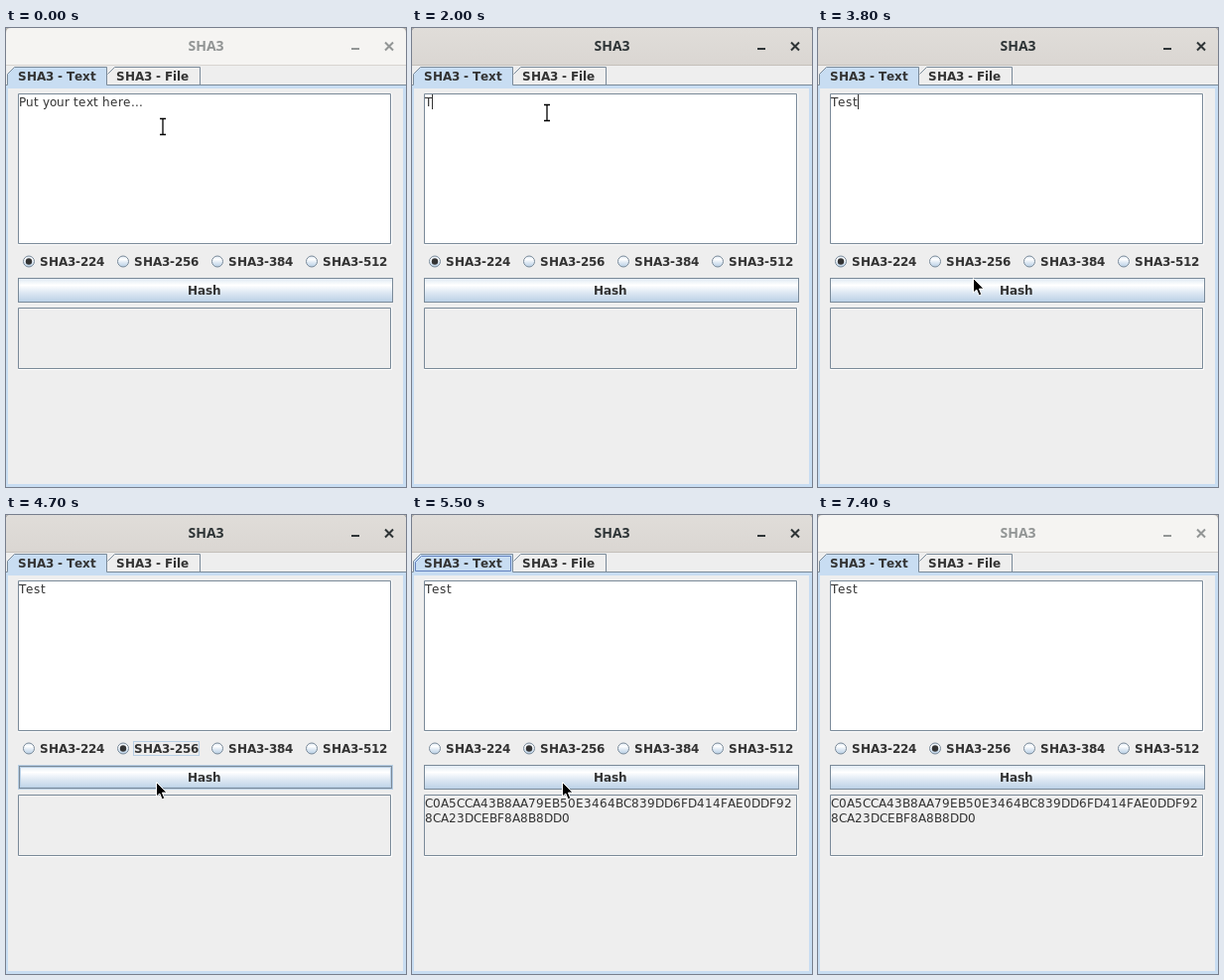
Recreate the animation shown at these times as an HTML page. Size 403 by 463 pixels, loop 7500 ms.

```html
<!DOCTYPE html>
<html lang="en">
<head>
<meta charset="utf-8">
<title>SHA3</title>
<style>
html, body { margin: 0; width: 100%; height: 100%; overflow: hidden; background: #eee; }
svg { display: block; }
text { font: 12px "DejaVu Sans", sans-serif; fill: #333; white-space: pre; }
.b { font-weight: bold; }
.title { font: bold 14px "Open Sans", sans-serif; text-anchor: middle; }
.line { fill: none; stroke: #7a8a99; }
.pale { fill: none; stroke: #b8cfe5; }
.focus { fill: none; stroke: #6382bf; }
.glyph { fill: none; stroke-width: 2; }

.anim { animation: 7.5s step-end infinite; }
#active { animation-name: active; }
#hint { animation-name: hint; }
#k1 { animation-name: k1; }
#k2 { animation-name: k2; }
#k3 { animation-name: k3; }
#k4 { animation-name: k4; }
#caret { animation-name: caret; }
#ibeam { animation-name: ibeam; }
#arrow { animation-name: arrow; }
#hover { animation-name: hover; }
#dot { animation-name: dot; }
#radioFocus { animation-name: radioFocus; }
#tabFocus { animation-name: tabFocus; }
#busy { animation-name: busy; }
#hash { animation-name: hash; }

@keyframes active { 0% { visibility: hidden } 4% { visibility: visible } 98.666% { visibility: hidden } }
@keyframes hint { 0% { visibility: visible } 5.333% { visibility: hidden } }
@keyframes k1 { 0% { visibility: hidden } 12%, 100% { visibility: visible } }
@keyframes k2 { 0% { visibility: hidden } 32%, 100% { visibility: visible } }
@keyframes k3 { 0% { visibility: hidden } 34.666%, 100% { visibility: visible } }
@keyframes k4 { 0% { visibility: hidden } 37.333%, 100% { visibility: visible } }
@keyframes caret {
  0% { visibility: hidden; transform: translate(13px, 67px) }
  5.333% { visibility: visible; transform: translate(13px, 67px) }
  12% { visibility: visible; transform: translate(20px, 67px) }
  20% { visibility: hidden; transform: translate(20px, 67px) }
  26.666% { visibility: visible; transform: translate(20px, 67px) }
  32% { visibility: visible; transform: translate(28px, 67px) }
  34.666% { visibility: visible; transform: translate(35px, 67px) }
  37.333% { visibility: visible; transform: translate(40px, 67px) }
  44% { visibility: hidden; transform: translate(40px, 67px) }
  50.666% { visibility: visible; transform: translate(40px, 67px) }
  56%, 100% { visibility: hidden; transform: translate(40px, 67px) }
}
@keyframes ibeam {
  0% { visibility: visible; transform: translate(158px, 99px) }
  2.666% { visibility: visible; transform: translate(150px, 94px) }
  4% { visibility: visible; transform: translate(141px, 88px) }
  5.333% { visibility: visible; transform: translate(136px, 85px) }
  41.333% { visibility: visible; transform: translate(122px, 128px) }
  42.666% { visibility: visible; transform: translate(103px, 192px) }
  44%, 100% { visibility: hidden; transform: translate(103px, 192px) }
}
@keyframes arrow {
  0% { visibility: hidden; transform: translate(91px, 234px) }
  44% { visibility: visible; transform: translate(91px, 234px) }
  45.333% { visibility: visible; transform: translate(110px, 256px) }
  48% { visibility: visible; transform: translate(134px, 273px) }
  49.333% { visibility: visible; transform: translate(152px, 290px) }
  50.666% { visibility: visible; transform: translate(155px, 251px) }
  53.333% { visibility: visible; transform: translate(144px, 244px) }
  54.666% { visibility: visible; transform: translate(128px, 235px) }
  56% { visibility: visible; transform: translate(120px, 231px) }
  61.333% { visibility: visible; transform: translate(137px, 250px) }
  62.666% { visibility: visible; transform: translate(150px, 268px) }
  84% { visibility: visible; transform: translate(126px, 222px) }
  85.333% { visibility: visible; transform: translate(72px, 45px) }
  86.666% { visibility: visible; transform: translate(37px, 11px) }
  89.333%, 100% { visibility: hidden; transform: translate(37px, 11px) }
}
@keyframes hover {
  0% { visibility: hidden } 45.333% { visibility: visible } 49.333% { visibility: hidden }
  62.666% { visibility: visible } 68% { visibility: hidden }
}
@keyframes dot { 0% { transform: none } 57.333%, 100% { transform: translate(95px, 0) } }
@keyframes radioFocus { 0% { visibility: hidden } 56% { visibility: visible } 68% { visibility: hidden } }
@keyframes tabFocus { 0% { visibility: hidden } 68% { visibility: visible } 98.666% { visibility: hidden } }
@keyframes busy { 0% { visibility: hidden } 68% { visibility: visible } 73.333% { visibility: hidden } }
@keyframes hash { 0% { visibility: hidden } 73.333%, 100% { visibility: visible } }
</style>
</head>
<body>
<svg width="403" height="463" viewBox="0 0 403 463">
  <defs>
    <linearGradient id="ocean" x2="0" y2="1">
      <stop stop-color="#dde8f3"/>
      <stop offset=".3" stop-color="#fff"/>
      <stop offset=".6" stop-color="#dde8f3"/>
      <stop offset="1" stop-color="#b8cfe5"/>
    </linearGradient>
    <linearGradient id="bar" x2="0" y2="1">
      <stop stop-color="#e0ddd9"/>
      <stop offset="1" stop-color="#dad6d2"/>
    </linearGradient>
    <path id="barShape" d="M0 38V5Q0 0 5 0H398Q403 0 403 5V38Z"/>
    <g id="controls" class="glyph">
      <path d="M348 21H356"/>
      <path d="M382 14.500L390 22.500M390 14.500L382 22.500"/>
    </g>
    <circle id="radio" cx="23" cy="235.500" r="5.500" fill="url(#ocean)" stroke="#7a8a99"/>
  </defs>

  <rect width="403" height="463" fill="#eee"/>
  <rect width="403" height="8" fill="#b8b5b0"/>
  <use href="#barShape" fill="#f5f4f2"/>
  <path d="M0 37.500H403" stroke="#d8d4d0"/>
  <text class="title" x="201.500" y="23" style="fill:#929595">SHA3</text>
  <use href="#controls" stroke="#929595"/>
  <g id="active" class="anim">
    <use href="#barShape" fill="url(#bar)"/>
    <path d="M0 37.500H403" stroke="#c4bfb9"/>
    <text class="title" x="201.500" y="23" style="fill:#2e3436">SHA3</text>
    <use href="#controls" stroke="#2e3436"/>
  </g>

  <!-- tabs -->
  <path d="M0 58H403V463H0Z" fill="#c8ddf2"/>
  <path d="M2 61H400V460H2Z" fill="#eee"/>
  <path d="M2 58V46L9 39H102V58Z" fill="#c8ddf2"/>
  <path class="line" d="M0 57.500H1.500V46.500L8.500 39.500H101.500V57.500H403M102.500 46.500L109.500 39.500H195.500V57.500"/>
  <path id="tabFocus" class="focus anim" d="M3.500 56.500V47.500L9.500 41.500H99.500V56.500Z"/>
  <text class="b snap" x="12" y="53">SHA3 - Text</text>
  <text class="b snap" x="111" y="53">SHA3 - File</text>

  <!-- input -->
  <path d="M12 66H389V219H12Z" fill="#fff"/>
  <path class="line" d="M12.500 66.500H387.500V217.500H12.500Z"/>
  <text id="hint" class="snap anim" x="13" y="79">Put your text here...</text>
  <text class="snap" x="13" y="79"><tspan id="k1" class="anim">T</tspan><tspan id="k2" class="anim">e</tspan><tspan id="k3" class="anim">s</tspan><tspan id="k4" class="anim">t</tspan></text>
  <rect id="caret" class="anim" width="1" height="15" fill="#333"/>

  <!-- algorithm -->
  <use href="#radio"/>
  <use href="#radio" x="95"/>
  <use href="#radio" x="190"/>
  <use href="#radio" x="285"/>
  <circle id="dot" class="anim" cx="23" cy="235.500" r="3.200" fill="#333"/>
  <rect id="radioFocus" class="pale anim" x="128.500" y="228.500" width="66" height="14"/>
  <text class="b snap" x="34" y="240">SHA3-224</text>
  <text class="b snap" x="129" y="240">SHA3-256</text>
  <text class="b snap" x="224" y="240">SHA3-384</text>
  <text class="b snap" x="319" y="240">SHA3-512</text>

  <!-- button -->
  <rect x="12" y="252" width="378" height="25" fill="url(#ocean)"/>
  <rect class="line" x="12.500" y="252.500" width="377" height="24"/>
  <g id="hover" class="anim">
    <rect class="pale" x="12.500" y="252.500" width="377" height="24"/>
    <rect class="line" x="13.500" y="253.500" width="375" height="22"/>
    <rect class="pale" x="14.500" y="254.500" width="373" height="20"/>
  </g>
  <text class="b snap" x="183" y="269">Hash</text>

  <!-- output -->
  <path d="M12 344.500H388.500V282" fill="none" stroke="#fff"/>
  <path class="line" d="M12.500 282.500H387.500V343.500H12.500Z"/>
  <g id="hash" class="anim">
    <text class="snap" x="13" y="295">C0A5CCA43B8AA79EB50E3464BC839DD6FD414FAE0DDF92</text>
    <text class="snap" x="13" y="310">8CA23DCEBF8A8B8DD0</text>
  </g>

  <g id="busy" class="anim">
    <rect x="12.500" y="252.500" width="377" height="24" fill="#eee" stroke="#b8cfe5"/>
    <text class="b snap" x="183" y="269" style="fill:#999">Hash</text>
    <rect class="line" x="12.500" y="350.500" width="377" height="24"/>
  </g>

  <!-- pointers -->
  <g id="ibeam" class="anim" fill="none">
    <path d="M-3.500 -7.500H3.500M-3.500 8.500H3.500M0 -7.500V8.500" stroke="#fff" stroke-width="3"/>
    <path d="M-3 -7.500H3M-3 8.500H3M0 -7.500V8.500" stroke="#000" stroke-width="1.300"/>
  </g>
  <path id="arrow" class="anim" d="M1.500 1.500V16L4.800 13L7.200 18.800L9.800 17.700L7.400 12.100H12Z" fill="#000" stroke="#fff"/>
</svg>
<script>
// Whole-pixel glyph advances, as the toolkit's hinted font has them.
const pen = document.createElement('canvas').getContext('2d');
const hinted = { e: 8, s: 7 };

function snap(el) {
  const bold = el.classList.contains('b');
  pen.font = `${bold ? 'bold ' : ''}12px "DejaVu Sans", sans-serif`;
  let x = +el.getAttribute('x');
  const xs = [...el.textContent].map(ch => {
    const at = x;
    x += (!bold && hinted[ch]) || Math.round(pen.measureText(ch).width);
    return at;
  });
  el.setAttribute('x', xs.join(' '));
}

document.querySelectorAll('.snap').forEach(snap);
</script>
</body>
</html>
```
